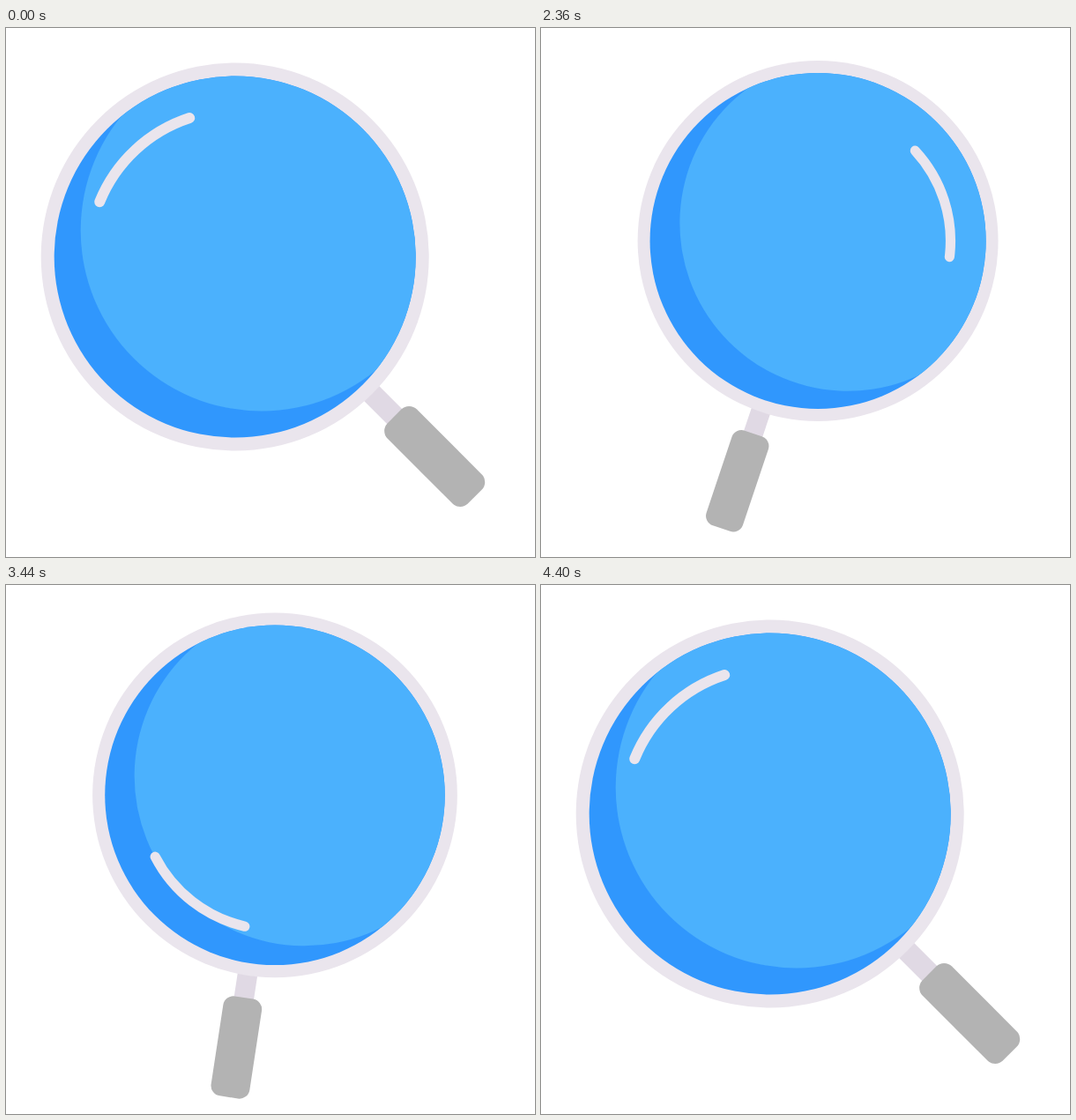
Animation of 600x600 px, one loop 4430 ms. Source, as an HTML page:

```html
<!DOCTYPE html>
<html lang="en">
<head>
<meta charset="utf-8">
<title>Magnifying glass</title>
<style>
  html, body { margin: 0; width: 100%; height: 100%; overflow: hidden; background: #fff; }
  svg { display: block; width: 100vw; height: 100vh; }
</style>
</head>
<body>
<svg viewBox="0 0 600 600">
  <defs>
    <clipPath id="glass"><circle r="205"/></clipPath>
  </defs>
  <g id="lens">
    <g id="handle">
      <rect id="neck" x="200" y="-12" height="24" fill="#e0d9e4"/>
      <rect id="grip" y="-23.5" height="47" rx="12.5" fill="#b3b3b3"/>
    </g>
    <circle r="220" fill="#eae5ed"/>
    <circle r="205" fill="#3097fd"/>
    <g clip-path="url(#glass)">
      <circle id="shine" cx="30" cy="-30" r="205" fill="#4bb1fd"/>
    </g>
    <path id="glint" fill="none" stroke="#eae5ed" stroke-width="12" stroke-linecap="round"/>
  </g>
</svg>
<script>
const LOOP = 4430, START = 2030, STEP = 30, STEPS = 80;
const el = id => document.getElementById(id);
const [lens, handle, neck, grip, shine, glint] =
  ['lens', 'handle', 'neck', 'grip', 'shine', 'glint'].map(el);

// Cubic Bezier easing with control points (x1, 0) and (x2, 1)
function ease(x, x1, x2) {
  if (x <= 0) return 0;
  if (x >= 1) return 1;
  let lo = 0, hi = 1;
  for (let i = 0; i < 30; i++) {
    const t = (lo + hi) / 2, s = 1 - t;
    if (3 * s * s * t * x1 + 3 * s * t * t * x2 + t * t * t < x) lo = t; else hi = t;
  }
  return lo * lo * (3 - 2 * lo);
}

function arc(r, half) {
  const a = half * Math.PI / 180, x = r * Math.cos(a), y = r * Math.sin(a);
  return `M${x} ${-y}A${r} ${r} 0 0 1 ${x} ${y}`;
}

function draw(ms) {
  const t = ms % LOOP;
  const k = t < START ? 0 : Math.min(STEPS, Math.floor((t - START) / STEP) + 1);

  // q: swing from right (0) to left (1) and back
  const q = ease(k / 26.6, 0.4, 0.2) - ease((k - 33.4) / 46.6, 0.4, 0.2);
  const mid = Math.max(0, q * (1 - q));
  const bow = Math.pow(4 * mid, 0.7);
  const cx = 259.7 + 74 * q + 25 * mid * (2 * q - 1);
  const cy = 259.5 - mid * (94 - 10 * q);
  lens.setAttribute('transform', `translate(${cx} ${cy}) scale(${1 - 0.1 * q})`);

  // The handle shortens slightly in mid swing
  const swing = 90 * q;
  const length = 129 * (1 - 0.06 * bow);
  const near = 320.3 * (1 - 0.04 * bow) - length / 2;
  handle.setAttribute('transform', `rotate(${45 + swing})`);
  neck.setAttribute('width', near - 190);
  grip.setAttribute('x', near);
  grip.setAttribute('width', length);

  shine.setAttribute('transform', `rotate(${20 * q})`);

  // The glint swings with the handle and makes two turns of its own
  const spin = 720 * ease(k / STEPS, 0.34, 0.43);
  glint.setAttribute('d', arc(165.7 - 5.5 * q, 24.9));
  glint.setAttribute('transform', `rotate(${spin + swing - 133})`);
}

let begin;
function tick(now) {
  if (begin === undefined) begin = now;
  draw(now - begin);
  requestAnimationFrame(tick);
}
draw(0);
requestAnimationFrame(tick);
</script>
</body>
</html>
```
